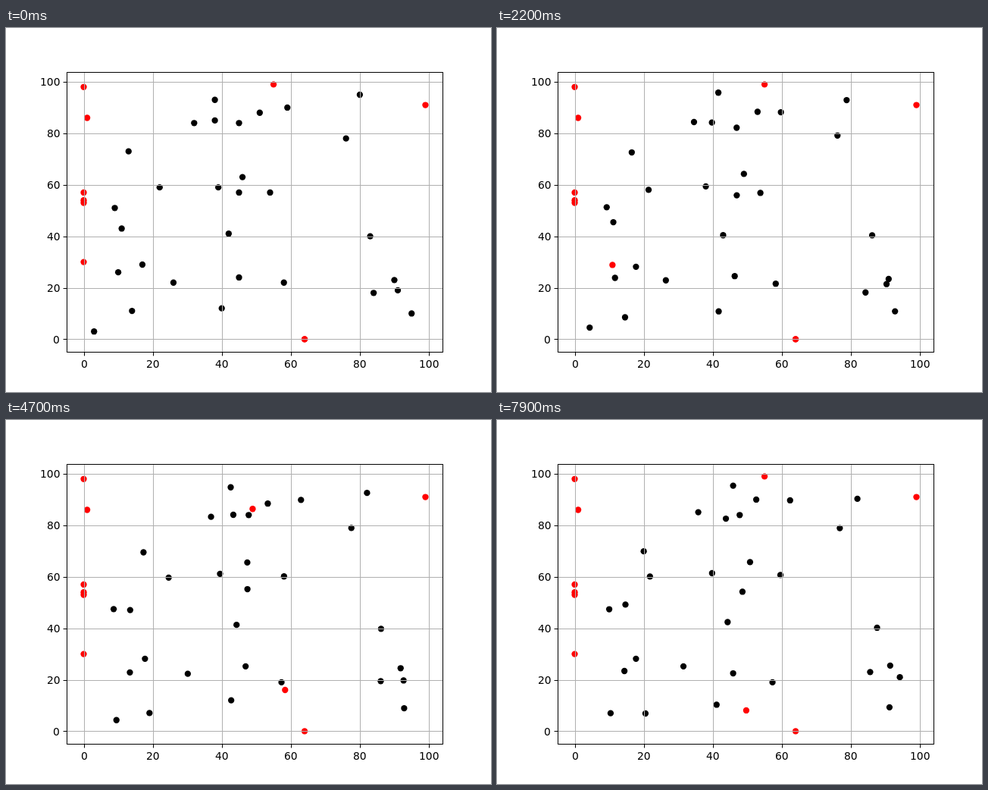
Write an HTML page with a canvas that moves like this. It is 640x480 px and loops after 8 s.

```html
<!DOCTYPE html>
<html lang="en">
<head>
<meta charset="utf-8">
<title>Scatter</title>
<style>
  html, body { margin: 0; width: 100%; height: 100%; overflow: hidden; background: #fff; }
  canvas { display: block; }
</style>
</head>
<body>
<canvas id="stage" width="640" height="480"></canvas>
<script>
const ctx = document.getElementById('stage').getContext('2d');
const STEPS = 80, STEP_MS = 100;
const px = x => 80 + (x + 4.95) * 496 / 108.9;
const py = y => 427.2 - (y + 4.95) * 369.6 / 108.9;
const snap = v => Math.floor(v + 0.5) + 0.5;

let seed = 7;
const random = () => (seed = seed * 16807 % 2147483647) / 2147483647;

// Random steps of up to one unit, pulled back to zero and ending there.
function wander(n) {
  const drift = [0];
  for (let i = 1; i <= n; i++) drift.push(drift[i - 1] * 0.8 + random() * 2 - 1);
  return drift.map((d, i) => d - drift[n] * i / n);
}

// Each walker strays from its start to its end and rests from step `caught`.
function walker([x0, y0, x1, y1, caught = STEPS - 1]) {
  const dx = wander(caught), dy = wander(caught);
  const path = Array.from({ length: STEPS }, (_, step) => {
    const i = Math.min(step, caught), t = i / caught;
    return [x0 + (x1 - x0) * t + dx[i], y0 + (y1 - y0) * t + dy[i]];
  });
  return { path, caught };
}

const walkers = [
  [38, 93, 45.9, 95.4], [38, 85, 43.8, 82.6], [32, 84, 35.8, 85.1],
  [45, 84, 47.8, 84, 33], [51, 88, 52.6, 90], [59, 90, 62.4, 89.7],
  [80, 95, 81.9, 90.3], [76, 78, 76.8, 78.9], [13, 73, 20, 69.9],
  [22, 59, 21.8, 60.1], [39, 59, 39.8, 61.4], [46, 63, 50.8, 65.7],
  [45, 57, 48.6, 54.2], [54, 57, 59.6, 60.7], [9, 51, 10, 47.4],
  [11, 43, 14.7, 49.2], [42, 41, 44.3, 42.4], [83, 40, 87.6, 40.2],
  [10, 26, 14.4, 23.4], [17, 29, 17.75, 28.15, 11], [26, 22, 31.5, 25.2],
  [45, 24, 45.9, 22.5], [58, 22, 57.3, 19, 30], [14, 11, 20.5, 6.9],
  [40, 12, 41.1, 10.3, 66], [3, 3, 10.4, 7], [84, 18, 85.6, 23],
  [90, 23, 91.4, 25.5], [91, 19, 94.2, 21], [95, 10, 91.2, 9.3]
].map(walker);

const hunters = [[0, 98], [1, 86], [0, 57], [0, 54], [0, 53], [0, 30], [55, 99],
  [99, 91], [64, 0], [64, 0]].map(home => ({ home, goal: home, at: home, path: [] }));

const gap = (a, b) => Math.hypot(a[0] - b[0], a[1] - b[1]);

function advance(from, to) {
  const d = gap(from, to);
  return d <= 1 ? to : from.map((v, i) => v + (to[i] - v) / d);
}

// The nearest hunter visits each caught walker at one unit per step, then goes home.
for (let step = 0; step < STEPS; step++) {
  for (const h of hunters) {
    h.at = advance(h.at, h.goal);
    h.path.push(h.at);
    if (h.at === h.goal) h.goal = h.home;
  }
  for (const { path, caught } of walkers) {
    if (caught !== step || step === STEPS - 1) continue;
    const prey = path[step];
    const nearest = hunters.reduce((a, b) => gap(b.at, prey) < gap(a.at, prey) ? b : a);
    nearest.goal = prey;
  }
}

function dots(group, color, step) {
  ctx.fillStyle = color;
  for (const { path } of group) {
    const [x, y] = path[step];
    ctx.beginPath();
    ctx.arc(px(x), py(y), 4.15, 0, Math.PI * 2);
    ctx.fill();
  }
}

function line(x0, y0, x1, y1, color) {
  ctx.strokeStyle = color;
  ctx.beginPath();
  ctx.moveTo(x0, y0);
  ctx.lineTo(x1, y1);
  ctx.stroke();
}

function axes() {
  ctx.lineWidth = 1;
  ctx.fillStyle = '#000';
  ctx.font = '13.89px "DejaVu Sans", sans-serif';
  for (let v = 0; v <= 100; v += 20) {
    const x = snap(px(v)), y = snap(py(v));
    line(x, 58, x, 427, '#b0b0b0');
    line(80, y, 576, y, '#b0b0b0');
    line(x, 427.5, x, 432.4, '#000');
    line(75.6, y, 80.5, y, '#000');
    // Labels start on whole pixels.
    const width = ctx.measureText(v).width;
    ctx.fillText(v, Math.round(px(v) - width / 2 + 0.4), 448);
    ctx.fillText(v, Math.round(71.3 - width), Math.round(py(v) + 5.1));
  }
  ctx.strokeStyle = '#000';
  ctx.strokeRect(80.5, 58.5, 496, 369);
}

function draw() {
  const step = Math.floor(performance.now() / STEP_MS) % STEPS;
  ctx.fillStyle = '#fff';
  ctx.fillRect(0, 0, 640, 480);
  dots(walkers, '#000', step);
  dots(hunters, '#f00', step);
  axes();
  requestAnimationFrame(draw);
}
draw();
</script>
</body>
</html>
```
